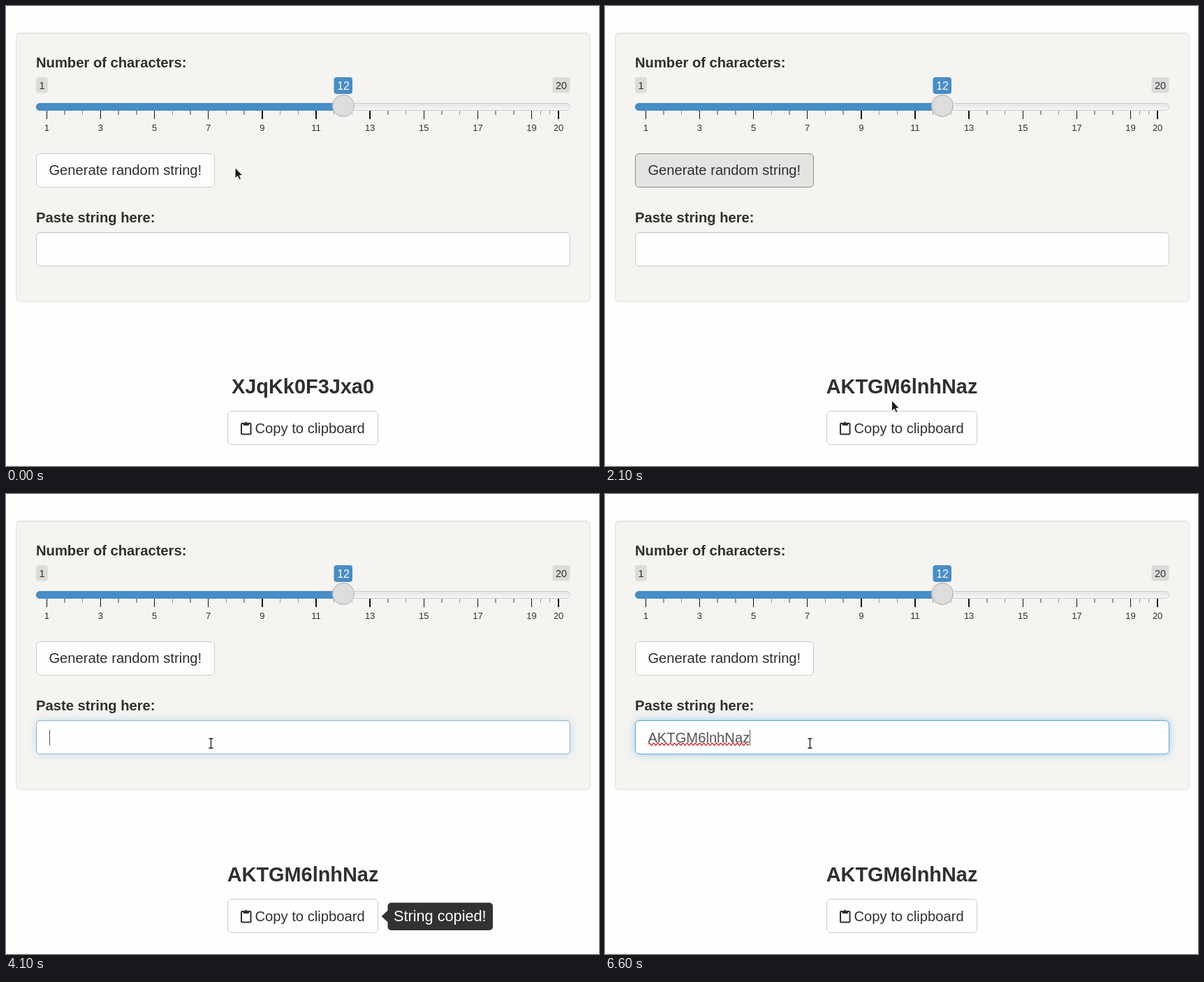
An HTML page for the animation above (6.9 s loop, 849 by 659 pixels).

```html
<!DOCTYPE html>
<html lang="en">
<head>
<meta charset="utf-8">
<title>Random string generator</title>
<style>
html, body { margin: 0; width: 100%; height: 100%; overflow: hidden; background: #fefefd; }
#stage { position: absolute; left: 0; top: 0; width: 849px; height: 659px; overflow: hidden; }
.box { position: absolute; box-sizing: border-box; border: 1px solid #ccc; border-radius: 6px; background: #fefefe; }
#panel { left: 14px; top: 38px; width: 823px; height: 386px; background: #f5f4f1; border-color: #e3e3e2; box-shadow: inset 0 1px 2px rgba(0,0,0,.06); }
#generate { left: 43px; top: 211px; width: 256px; height: 49px; }
#copy { left: 317px; top: 580px; width: 216px; height: 49px; }
#field { left: 43px; top: 324px; width: 765px; height: 49px; }
#track { left: 43px; top: 139px; width: 765px; height: 11px; background: linear-gradient(#ddd -50%, #fff 150%); }
#bar { left: 43px; top: 139px; width: 440px; height: 11px; border: 0; border-radius: 6px 0 0 6px; background: #478dc6; }
#handle { left: 467px; top: 127px; width: 32px; height: 32px; border-color: #aaa; border-radius: 50%; background: #dedddd; box-shadow: 1px 1px 3px rgba(255,255,255,.6); }
.hover { background: #e5e4e3; border-color: #adadad; }
.focus { background: #e5e4e3; border-color: #8c8c8c; }
.active { background: #d3d2d1; border-color: #adadad; box-shadow: inset 0 3px 5px rgba(0,0,0,.125); }
.active::after { content: ""; position: absolute; inset: 2px; border: 2px solid #101010; border-radius: 3px; box-shadow: 0 0 0 2px #fff; }
svg { position: absolute; left: 0; top: 0; }
text { font: 20.2px "Liberation Sans", Arial, sans-serif; fill: #2f2f2d; }
.bold { font-weight: bold; }
.title { font-size: 28.9px; font-weight: bold; }
.limit { font-size: 14.4px; }
.value { font-size: 15.9px; fill: #fff; }
.tick { font-size: 13px; }
.tip { font-size: 21.7px; fill: #fff; }
.mid { text-anchor: middle; }
</style>
</head>
<body>
<div id="stage">
  <div class="box" id="panel"></div>
  <div class="box" id="track"></div>
  <div class="box" id="bar"></div>
  <div class="box" id="generate"></div>
  <div class="box" id="field"></div>
  <div class="box" id="copy"></div>
  <svg width="849" height="659">
    <g id="scale"></g>
    <g fill="#dcdbda">
      <rect x="43" y="102" width="17" height="22.5" rx="4"/>
      <rect x="782.5" y="102" width="25" height="22.5" rx="4"/>
      <rect x="469.5" y="102" width="26.5" height="24" rx="4" fill="#478dc6"/>
    </g>
    <text class="limit mid" x="51.5" y="119">1</text>
    <text class="limit mid" x="795" y="119">20</text>
    <text class="value mid" x="483" y="120">12</text>
    <text class="bold" x="43" y="88">Number of characters:</text>
    <text class="bold" x="43" y="310">Paste string here:</text>
    <text x="61.4" y="242">Generate random string!</text>
    <text id="pasted" x="61.4" y="356" style="fill:#555"></text>
    <path id="squiggle" fill="none" stroke="#cf1f2b" stroke-width="1.3"/>
    <rect id="caret" y="338" width="1" height="22" fill="#555"/>
    <text id="title" class="title mid" x="425" y="555"></text>
    <g fill="none" stroke="#2f2f2d" stroke-width="2">
      <rect x="337" y="598" width="13.5" height="15.5" rx="1"/>
      <path d="M340 600.5v-3h2q1.7 -3 3.5 0h2v3z" fill="#2f2f2d" stroke-width="1"/>
    </g>
    <text x="356.5" y="612">Copy to clipboard</text>
    <g id="tooltip">
      <path d="M537.6 605l9.4 -8.7v17.4z" fill="#333230"/>
      <rect x="546.5" y="585.5" width="150.5" height="39.5" rx="5" fill="#333230"/>
      <text class="tip" x="555" y="612">String copied!</text>
    </g>
  </svg>
  <div class="box" id="handle"></div>
  <svg width="849" height="659">
    <g id="arrow"><path d="M0 0V15.5L3.6 12.3L6 17.5L8.6 16.4L6.3 11.3H11Z" fill="#1c1c1c" stroke="#fff"/></g>
    <g id="hand">
      <path d="M-1.5 1.5Q0 -1 1.5 1.5V6.5Q3.5 5 4.5 7Q6.3 6 7 8Q9 7.5 9 9.5V13L7.5 17.5H-1.5L-6 11.5Q-6 9.5 -4 10L-1.5 12Z" fill="#fff" stroke="#1c1c1c" stroke-width="1.2" stroke-linejoin="round"/>
      <path d="M1.5 11.5v3.5m2.5 0v-3.5m2.5 0v3.5" fill="none" stroke="#555" stroke-width=".8"/>
    </g>
    <g id="beam" fill="none">
      <path id="stem" d="M-3 -6.5Q0 -6.5 0 -5V5.5Q0 7 -3 7M3 -6.5Q0 -6.5 0 -5V5.5Q0 7 3 7" stroke="#fff" stroke-width="2.8"/>
      <use href="#stem"/>
      <path d="M-3 -6.5h6M0 -6.5V7M-3 7h6" stroke="#1c1c1c" stroke-width="1.3"/>
    </g>
  </svg>
</div>
<script>
const LOOP = 6900, STEP = 100;
const $ = id => document.getElementById(id);
const show = (id, on) => { $(id).style.display = on ? "" : "none"; };
const between = (t, a, b) => t >= a && t < b;
const ramp = (t, a, b) => Math.min(1, Math.max(0, (t - a) / (b - a)));
const easeInOut = p => p * p * (3 - 2 * p);
const easeOut = p => 1 - (1 - p) ** 3;

// Pointer travels between resting places
const home = { x: 328, y: 231.5 };
const moves = [
  { from: 100, to: 400, x: 275, y: 230, ease: easeInOut },    // onto the generate button
  { from: 1000, to: 1400, x: 354, y: 242, ease: easeInOut },
  { from: 1500, to: 1900, x: 413, y: 508, ease: easeInOut },
  { from: 2000, to: 2300, x: 409.5, y: 589, ease: easeOut },  // onto the copy button
  { from: 2900, to: 3300, x: 330, y: 396, ease: easeInOut },
  { from: 3300, to: 3700, x: 293.5, y: 357, ease: easeOut }   // into the text field
];

function pointerAt(t) {
  let { x, y } = home;
  for (const m of moves) {
    const p = m.ease(ramp(t, m.from, m.to));
    x += (m.x - x) * p;
    y += (m.y - y) * p;
  }
  return { x, y };
}

function buildScale() {
  const at = value => 58.3 + (value - 1) * 38.57;
  const tick = (x, h, color) =>
    `<rect x="${x - .7}" y="150" width="1.44" height="${h}" fill="${color}" shape-rendering="crispEdges"/>`;
  let out = "";
  for (let v = 1; v <= 20; v = v < 19 ? v + 2 : v + 1) {
    const gap = Math.min(2, 20 - v);
    out += tick(at(v), 11.5, "#111");
    out += `<text class="tick mid" x="${at(v)}" y="179">${v}</text>`;
    if (gap) out += tick(at(v + gap / 3), 5.8, "#999") + tick(at(v + gap * 2 / 3), 5.8, "#999");
  }
  $("scale").innerHTML = out;
}

function buildSquiggle() {
  $("squiggle").setAttribute("d", "M62 358.5" + "q1.5 -3 3 0q1.5 3 3 0".repeat(24));
}

function drawPointer(t) {
  const { x, y } = pointerAt(t);
  const kind = between(t, 300, 1100) || between(t, 2200, 3100) ? "hand" : t >= 3500 ? "beam" : "arrow";
  for (const id of ["arrow", "hand", "beam"]) show(id, id === kind);
  $(kind).setAttribute("transform", `translate(${x} ${y})`);
}

function drawButtons(t) {
  $("generate").className = "box " + (
    between(t, 700, 800) ? "active" :
    between(t, 300, 1100) ? "hover" :
    between(t, 1100, 2400) ? "focus" : "");
  $("copy").className = "box " + (
    between(t, 2400, 2500) ? "active" :
    between(t, 2200, 3100) ? "hover" : "");
  $("title").textContent = t < 800 ? "XJqKk0F3Jxa0" : "AKTGM6lnhNaz";
}

function drawTooltip(t) {
  const leaving = ramp(t, 4100, 4400);
  const shift = 8.5 * (easeOut(ramp(t, 2700, 3000)) - leaving - 1);
  $("tooltip").setAttribute("opacity", ramp(t, 2600, 2840) - leaving);
  $("tooltip").setAttribute("transform", `translate(${shift} 0)`);
}

function drawField(t) {
  const glow = ramp(t, 3850, 4300), mix = (a, b) => a + (b - a) * glow;
  $("field").style.borderColor = `rgb(${mix(204, 102)},${mix(204, 168)},${mix(204, 217)})`;
  $("field").style.boxShadow =
    `inset 0 1px 1px rgba(0,0,0,.075), 0 0 11.5px rgba(102,175,233,${.6 * glow})`;

  const pasted = t >= 5300;
  $("pasted").textContent = pasted ? "AKTGM6lnhNaz" : "";
  show("squiggle", t >= 5500);
  $("caret").setAttribute("x", pasted ? 207 : 62);
  show("caret", between(t, 4000, 4600) || between(t, 5300, 5900) || t >= 6600);
}

function draw(t) {
  drawPointer(t);
  drawButtons(t);
  drawTooltip(t);
  drawField(t);
}

const start = performance.now();
function frame() {
  const t = (performance.now() - start) % LOOP;
  draw(Math.floor(t / STEP) * STEP);
  requestAnimationFrame(frame);
}
buildScale();
buildSquiggle();
draw(0);
requestAnimationFrame(frame);
</script>
</body>
</html>
```
